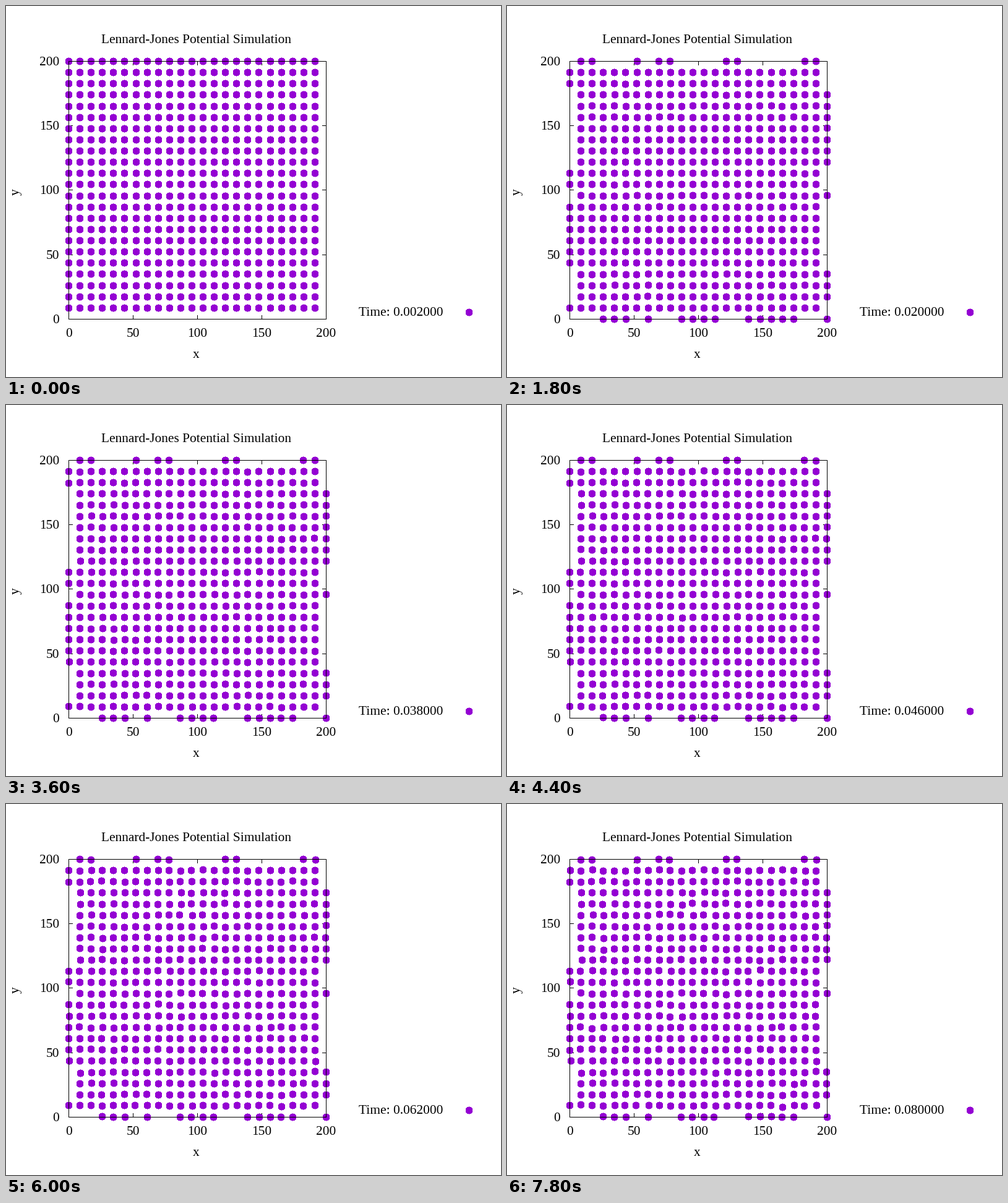
Animation of 800 by 600 pixels, one loop 8 s. Source, as a matplotlib script:

```python
import numpy as np
import matplotlib.pyplot as plt
from matplotlib.animation import FuncAnimation
from matplotlib.collections import PolyCollection
from matplotlib.patches import Rectangle

W, H, DPI = 800, 600, 100
LEFT, TOP, RIGHT, BOTTOM = 101, 89, 517, 506
SIZE = np.array([RIGHT - LEFT, BOTTOM - TOP])
N, FRAMES, STEP = 23, 40, 0.002
TICK = 6
PURPLE = "#9400d3"

plt.rcParams["font.family"] = "Liberation Serif"
plt.rcParams["font.size"] = 16 * 96 / DPI

fig = plt.figure(figsize=(W / DPI, H / DPI), dpi=DPI, facecolor="white")
ax = fig.add_axes([0, 0, 1, 1])
ax.set_xlim(0, W)
ax.set_ylim(H, 0)
ax.axis("off")


def line(x0, y0, x1, y1, z=1):
    """One pixel wide line, both ends included."""
    ax.add_patch(Rectangle((x0, y0), x1 - x0 + 1, y1 - y0 + 1, lw=0,
                           facecolor="black", antialiased=False, zorder=z))


def label(x, y, s, **kw):
    return ax.text(x, y, s, va="baseline", **kw)


def dot_shape(r=6):
    """Pixel-stepped disc outline around the centre of a pixel."""
    right = []
    for dy in range(-r, r + 1):
        half = min(r - 1, int(np.sqrt(r * r - dy * dy)))
        right += [(half + 1, dy), (half + 1, dy + 1)]
    left = [(1 - x, y) for x, y in reversed(right)]
    return np.array(right + left, float)


def add_dots(verts):
    dots = PolyCollection(verts, facecolors=PURPLE, edgecolors="none",
                          linewidths=0, antialiaseds=False, zorder=3)
    ax.add_collection(dots, autolim=False)
    return dots


# Border in front of the dots, ticks behind them
for x in (LEFT, RIGHT):
    line(x, TOP, x, BOTTOM, 4)
for y in (TOP, BOTTOM):
    line(LEFT, y, RIGHT, y, 4)

for k in range(5):
    x = int(LEFT + SIZE[0] * k / 4 + 0.5)
    y = BOTTOM - int(SIZE[1] * k / 4 + 0.5)
    line(x, TOP, x, TOP + TICK)
    line(x, BOTTOM - TICK, x, BOTTOM)
    line(LEFT, y, LEFT + TICK, y)
    line(RIGHT - TICK, y, RIGHT, y)
    label(x + 0.5, 535, str(50 * k), ha="center")
    label(86, y + 7, str(50 * k), ha="right")

label(153.5, 60, "Lennard-Jones Potential Simulation")
label(307, 569, "x", ha="center")
label(21, 301, "y", ha="center", rotation=90, rotation_mode="anchor")
clock = label(569.5, 501, "")

# Square lattice; each particle drifts steadily in a random direction
site = np.stack(np.meshgrid(np.arange(N), np.arange(N)), axis=-1) * SIZE / N
drift = np.random.default_rng(7).normal(0, 0.68, (N, N, 2))


def steer(speed, inward):
    """Send the chosen edge particles inward and the others out to wrap."""
    sign = np.full(N, -1)
    sign[inward] = 1
    speed[:] = np.abs(speed) * sign


steer(drift[:, 0, 0], np.r_[1:3, 10:12, 13:19, 22])
steer(drift[0, :, 1], np.r_[1:3, 6, 8:10, 14:16, 21:23])

shape = dot_shape()
dots = add_dots([shape])
add_dots([shape + (748, 495)])


def update(i):
    pos = site + drift * i / (FRAMES - 1)
    pos = np.where(pos < 0, pos + SIZE, pos) + (LEFT, TOP)
    pos = np.floor(pos + 0.5).reshape(-1, 1, 2)
    dots.set_verts(pos + shape)
    clock.set_text(f"Time: {STEP * (i + 1):f}")
    return dots, clock


anim = FuncAnimation(fig, update, frames=FRAMES, interval=200, repeat=True,
                     repeat_delay=0, blit=False)
plt.show()
```
